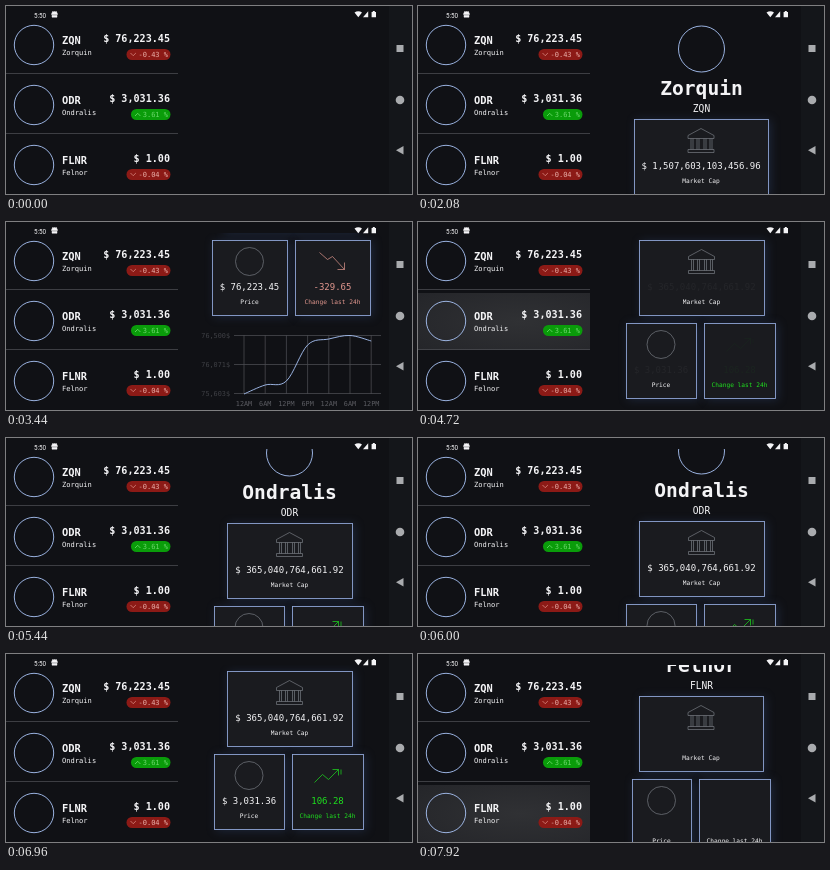
Recreate the animation shown at these times as an HTML page. Size 406 px wide and 188 px high, loop 8000 ms.

```html
<!DOCTYPE html>
<html lang="en">
<head>
<meta charset="utf-8">
<title>Coin tracker</title>
<style>
  html, body { margin: 0; width: 100%; height: 100%; overflow: hidden; background: #101115; }
  svg { display: block; width: 100%; height: 100%; }
  text { font-family: "DejaVu Sans Mono", monospace; white-space: pre; }
  .card { fill: #1a1b1f; stroke: #8fa5d6; stroke-width: .9; filter: drop-shadow(2px 1px 5px rgba(50, 70, 115, .38)); }
  .line { fill: none; stroke: #a9c3f5; stroke-width: .9; }
  .icon { fill: none; stroke: #777b83; stroke-width: .7; }
  .grid { fill: none; stroke: #4a4b50; stroke-width: .8; }
</style>
</head>
<body>
<svg id="stage" viewBox="0 0 406 188"></svg>
<script>
const LOOP = 8000;
const WHITE = '#f4f4f6', PINK = '#e3988f', GREEN = '#1fe01f';

const coins = [
  { name: 'Zorquin', code: 'ZQN', price: '$ 76,223.45', pct: '-0.43 %', tap: 1360, end: 4560,
    cap: '$ 1,507,603,103,456.96', change: '-329.65', tone: PINK, up: false,
    cards: [[216, 134], [206, 75], [289, 75]], axis: ['76,500$', '76,071$', '75,603$'],
    pitch: 21.2, curve: [350, 341, 337, 301, 295, 291.5, 297] },
  { name: 'Ondralis', code: 'ODR', price: '$ 3,031.36', pct: '3.61 %', tap: 4560, end: 7840,
    cap: '$ 365,040,764,661.92', change: '106.28', tone: GREEN, up: true,
    cards: [[221, 125], [208, 70], [286, 71]], axis: ['3,065$', '3,025$', '2,986$'],
    pitch: 20.5, curve: [350, 340, 341, 339, 324, 298, 292] },
  { name: 'Felnor', code: 'FLNR', price: '$ 1.00', pct: '-0.04 %', tap: 7840, end: LOOP,
    cap: '', change: '', tone: WHITE, up: false,
    cards: [[221, 124], [214, 59], [281, 71]] }
];

// [time, scroll offset of the detail pane]
const scrollKeys = [[0, 0], [2160, 0], [2700, 75], [3040, 150], [3440, 178], [4559, 178], [4560, 95],
  [4880, 95], [5680, 0], [5760, 0], [5840, 6], [6000, 30], [6200, 100], [6400, 161], [6640, 178],
  [6720, 172], [7040, 71], [LOOP, 71]];

const clamp = v => Math.max(0, Math.min(1, v));

function track(keys, t) {
  const i = Math.max(1, keys.findIndex(k => k[0] >= t));
  const [t0, a] = keys[i - 1], [t1, b] = keys[i];
  return a + (b - a) * clamp((t - t0) / (t1 - t0));
}

function text(x, mid, str, size, fill = WHITE, anchor = 'start', weight = 400) {
  return `<text x="${x}" y="${mid + size * .36}" font-size="${size}" fill="${fill}" text-anchor="${anchor}" font-weight="${weight}">${str}</text>`;
}
const path = (d, cls, extra = '') => `<path class="${cls}" d="${d}" ${extra}/>`;
const ring = (x, y, r, cls) => `<circle class="${cls}" cx="${x}" cy="${y}" r="${r}"/>`;

// Catmull-Rom spline
function smooth(pts) {
  let d = 'M' + pts[0];
  for (let i = 0; i < pts.length - 1; i++) {
    const a = pts[i], b = pts[i + 1], p = pts[i - 1] || a, n = pts[i + 2] || b;
    d += `C${a[0] + (b[0] - p[0]) / 6} ${a[1] + (b[1] - p[1]) / 6} ${b[0] - (n[0] - a[0]) / 6} ${b[1] - (n[1] - a[1]) / 6} ${b}`;
  }
  return d;
}

function row(c, i) {
  const y = 60 * i, left = c.up ? 125 : 120.5;
  return `<rect class="hit" y="${y + 11}" width="172" height="57" fill="url(#press)"/>` +
    ring(28, y + 39, 19.7, 'line') +
    text(56, y + 34.5, c.code, 10.4, WHITE, 'start', 700) +
    text(56, y + 46.5, c.name, 7.1) +
    text(164, y + 32.5, c.price, 10.1, WHITE, 'end', 700) +
    `<rect x="${left}" y="${y + 43}" width="${164.5 - left}" height="11" rx="5.5" fill="${c.up ? '#0a9c0a' : '#8c1a16'}"/>` +
    path(`M${left + 4} ${y + (c.up ? 50 : 47)}l2.7 ${c.up ? -2.7 : 2.7}l2.7 ${c.up ? 2.7 : -2.7}`, 'icon', `style="stroke:${c.up ? '#7be87b' : PINK}"`) +
    text(162, y + 48.5, c.pct, 7, c.up ? '#6bd66b' : '#eab0aa', 'end') +
    (i < 2 ? path(`M0 ${y + 67.5}H172`, 'grid') : '');
}

function card([x, w], y, icon, value, label, tone) {
  const mid = x + w / 2;
  return `<rect class="card" x="${x + .5}" y="${y + .5}" width="${w}" height="75"/>` +
    `<g transform="translate(${mid} ${y + 21.5})">${icon}</g>` +
    `<g class="late">${text(mid, y + 46.5, value, 9, tone, 'middle')}</g>` +
    text(mid, y + 62, label, 6.2, tone, 'middle');
}

function bank() {
  let d = 'M-13 -5L0 -12L13 -5V-2H-13ZM-13 9H13V12H-13Z';
  for (const x of [-10, -4, 3, 9]) d += `M${x} -2V9M${x + 2} -2V9`;
  return path(d, 'icon');
}

function trend(c) {
  const d = c.up ? 'M-13 7L-5 -1L1 4L11 -6M5 -6H11V0M13.5 -6V-1' : 'M-13 -9L-5 -2L0 -5L12 8M5 8H12V1';
  return c.change ? `<g class="late">${path(d, 'icon', `style="stroke:${c.tone}"`)}</g>` : '';
}

function chart(c) {
  if (!c.curve) return '';
  const xs = c.curve.map((_, i) => 238 + i * c.pitch), ys = [291.5, 320.5, 349.5];
  const hours = ['12AM', '6AM', '12PM', '6PM'];
  return path(xs.map(x => `M${x} 291V350`).join('') + ys.map(y => `M228 ${y}H375`).join(''), 'grid') +
    ys.map((y, i) => text(224, y, c.axis[i], 6.8, '#3f4045', 'end')).join('') +
    xs.map((x, i) => text(x, 359.5, hours[i % 4], 6.8, '#5b5c62', 'middle')).join('') +
    path(smooth(c.curve.map((y, i) => [xs[i], y])), 'line');
}

function detail(c) {
  const coin = ring(0, 0, 14, 'icon');
  return `<g class="pane">` + ring(283.5, 43, 23, 'line') +
    text(283.5, 82, c.name, 19.6, WHITE, 'middle', 700) +
    text(283.5, 102.5, c.code, 9.6, WHITE, 'middle') +
    card(c.cards[0], 113, bank(), c.cap, 'Market Cap', WHITE) +
    card(c.cards[1], 196, coin, c.change && c.price, 'Price', WHITE) +
    card(c.cards[2], 196, trend(c), c.change, 'Change last 24h', c.tone) +
    chart(c) + '</g>';
}

const system = `<rect x="383" width="23" height="188" fill="#14161a"/>
  <text x="28" y="11.5" font-size="6.3" fill="${WHITE}" style="font-family:Roboto,sans-serif">5:50</text>
  <path d="M45.5 8.5a3 3 0 0 1 6 0ZM46 9.2h5v2h-5ZM46 5l1.5 1.5M51 5l-1.5 1.5" fill="${WHITE}" stroke="${WHITE}" stroke-width=".5"/>
  <path d="M348.5 6.6Q352.3 3.8 356 6.6L352.3 11.3ZM357 11.2L362.2 5.2V11.2ZM365.6 6h1.2V5h2v1h1.2V11.2h-4.4Z" fill="${WHITE}"/>
  <g fill="#a9abae"><rect x="390.5" y="39" width="7" height="7"/><circle cx="394" cy="94" r="4.3"/><path d="M390 144.3L397.5 140V148.6Z"/></g>`;

const stage = document.getElementById('stage');
stage.innerHTML = `<defs>
    <radialGradient id="press" cx=".6" cy=".5" r=".75"><stop stop-color="#303134"/><stop offset="1" stop-color="#25262a"/></radialGradient>
    <clipPath id="view"><rect y="11" width="383" height="177"/></clipPath>
  </defs>
  <rect width="406" height="188" fill="#101115"/>
  <g clip-path="url(#view)">${coins.map(row).join('')}<g id="scroller">${coins.map(detail).join('')}</g></g>${system}`;

const scroller = document.getElementById('scroller');
const hits = stage.querySelectorAll('.hit');
const panes = stage.querySelectorAll('.pane');

function draw(t) {
  scroller.setAttribute('transform', `translate(0 ${-Math.round(track(scrollKeys, t))})`);
  coins.forEach((c, i) => {
    const age = t - c.tap;
    hits[i].style.opacity = age < 0 ? 0 : clamp(.5 + age / 160) * clamp((650 - age) / 400);
    panes[i].style.display = age >= 0 && t < c.end ? '' : 'none';
    panes[i].querySelectorAll('.late').forEach(el => el.style.opacity = clamp((age - 140) / 500));
  });
}

const start = performance.now();
function frame() {
  draw((performance.now() - start) % LOOP);
  requestAnimationFrame(frame);
}
frame();
</script>
</body>
</html>
```
